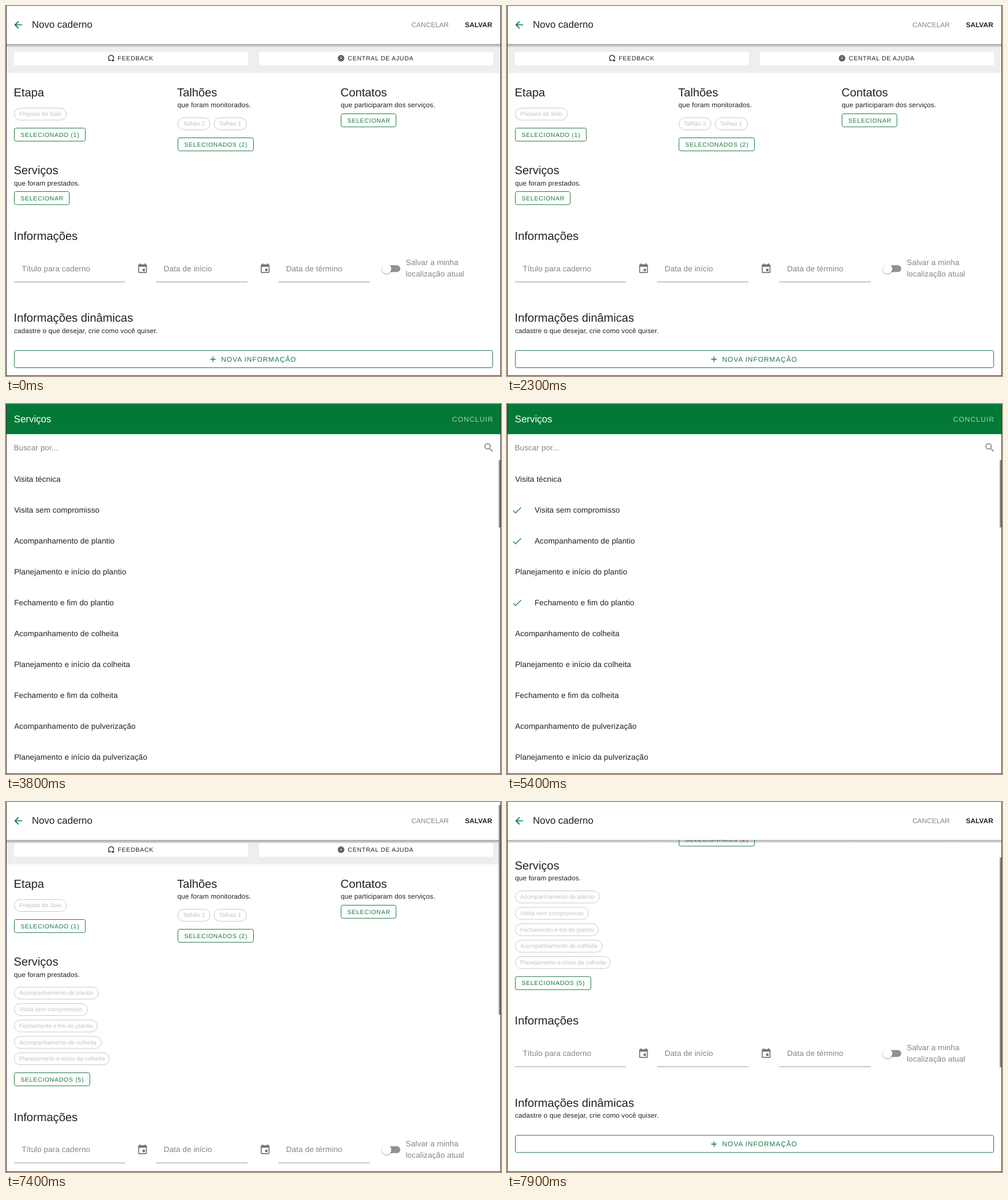
Animation of 865 by 647 pixels, one loop 8000 ms. Source, as an HTML page:

```html
<!DOCTYPE html>
<html lang="pt">
<head>
<meta charset="utf-8">
<style>
html, body { margin: 0; width: 100%; height: 100%; overflow: hidden; background: #fff; }
svg { display: block; font-family: "Liberation Sans", Arial, sans-serif; }
text { fill: #212121; white-space: pre; text-rendering: geometricPrecision; }
.head { font-size: 20.3px; }
.bar { font-size: 17px; }
.sub { font-size: 11.9px; letter-spacing: .127px; }
.item { font-size: 13.6px; letter-spacing: .1px; }
.label { font-size: 13.6px; letter-spacing: .1px; fill: #858585; }
.cap { font-size: 10.6px; letter-spacing: .7px; }
.green { fill: #1b7843; }
.chip { font-size: 10.2px; fill: #c2c2c2; }
.action { font-size: 12px; }
.wide { font-size: 12px; letter-spacing: .95px; }
.done { font-size: 12.3px; letter-spacing: 1px; fill: #a5cfb6; }
.outline { fill: #fff; stroke: #1b7843; }
.pill { fill: #fff; stroke: #c9c9c9; }
.line { fill: none; stroke: #222; stroke-width: 1.3; }
</style>
</head>
<body>
<script>
const W = 865, H = 647, LOOP = 8000;

const text = (x, y, s, cls, extra = '') => `<text x="${x}" y="${y}" class="${cls}" ${extra}>${s}</text>`;
const rect = (x, y, w, h, attrs) => `<rect x="${x}" y="${y}" width="${w}" height="${h}" ${attrs}/>`;
const icon = (x, y, d, fill) => `<path transform="translate(${x} ${y}) scale(.85)" fill="${fill}" d="${d}"/>`;
const section = (x, y, title, sub) => text(x - .5, y, title, 'head') + (sub ? text(x, y + 19.5, sub, 'sub') : '');
const button = (x, y, w, s) =>
  rect(x + .5, y + .5, w - 1, 22.8, 'rx="3" class="outline"') + text(x + 11.5, y + 15.5, s, 'cap green');
const chip = (x, y, w, s) =>
  rect(x + .5, y + .5, w - 1, 21, 'rx="10.5" class="pill"') + text(x + 9.2, y + 14.2, s, 'chip');

const BACK = 'M20 11H7.83l5.59-5.59L12 4l-8 8 8 8 1.41-1.41L7.83 13H20z';
const DATE = 'M17 12h-5v5h5zM16 1v2H8V1H6v2H5a2 2 0 0 0-2 2v14a2 2 0 0 0 2 2h14a2 2 0 0 0 2-2V5a2 2 0 0 0-2-2h-1V1zM19 19H5V8h14z';
const CHECK = 'M9 16.17 4.83 12l-1.42 1.41L9 19 21 7l-1.41-1.41z';
const SEARCH = 'M15.5 14h-.79l-.28-.27a6.5 6.5 0 1 0-.7.7l.27.28v.79l5 4.99L20.49 19zM9.5 14a4.5 4.5 0 1 1 0-9 4.5 4.5 0 0 1 0 9z';

const picked = ['Acompanhamento de plantio', 'Visita sem compromisso', 'Fechamento e fim do plantio',
  'Acompanhamento de colheita', 'Planejamento e início da colheita'];
const pillWidths = [148, 129, 146, 153, 167];

const field = (x, w, s) => text(x + 13.5, 463.5, s, 'label') + rect(x, 482, w, 1, 'fill="#959595"');

const toolbar = rect(0, 67, W, 50, 'fill="#eee"') +
  rect(14, 80, 408.5, 23.7, 'rx="2" fill="#fff"') + rect(442.5, 80, 408.5, 23.7, 'rx="2" fill="#fff"') +
  '<path class="line" d="M184 95.2h-4.6l1-1.6a4.4 4.4 0 1 1 7.4-1.4M186.9 92.8v4.4M184.7 95h4.4"/>' +
  text(195.2, 95.2, 'FEEDBACK', 'cap') +
  '<g class="line"><circle cx="585.5" cy="91.3" r="4.9"/><circle cx="585.5" cy="91.3" r="2.2"/>' +
  '<path d="M584 86.5v3M587 86.5v3M584 93v3M587 93v3M580.7 89.8h3M580.7 92.8h3M587.3 89.8h3M587.3 92.8h3" stroke-width="1"/></g>' +
  text(597.3, 95.2, 'CENTRAL DE AJUDA', 'cap');

const form = `<g id="form"><g id="page">${toolbar}
  ${section(14, 157.6, 'Etapa')}${chip(14, 178, 92, 'Preparo do Solo')}${button(14, 213, 125, 'SELECIONADO (1)')}
  ${section(299.6, 157.6, 'Talhões', 'que foram monitorados.')}
  ${chip(300, 195, 57, 'Talhão 2')}${chip(363, 195, 58, 'Talhao 1')}${button(300, 230, 133, 'SELECIONADOS (2)')}
  ${section(585, 157.6, 'Contatos', 'que participaram dos serviços.')}${button(585, 188, 97, 'SELECIONAR')}
  ${section(14, 294.2, 'Serviços', 'que foram prestados.')}
  <g id="empty">${button(14, 324, 97, 'SELECIONAR')}</g>
  <g id="filled">${picked.map((s, i) => chip(14, 331.2 + i * 28.7, pillWidths[i], s)).join('')}
    ${button(14, 481, 133, 'SELECIONADOS (5)')}</g>
  <g id="rest">${section(14, 409, 'Informações')}
    ${field(14, 194, 'Título para caderno')}${field(262, 160, 'Data de início')}${field(476, 160, 'Data de término')}
    ${icon(228.4, 449.2, DATE, '#757575')}${icon(442.6, 449.2, DATE, '#757575')}
    ${rect(660, 453.3, 29, 12, 'rx="6" fill="#929292"')}
    <circle cx="665" cy="459.6" r="8.5" fill="#fff" style="filter:drop-shadow(0 1.2px 1.2px #0006)"/>
    ${text(698.5, 453.4, 'Salvar a minha', 'label')}${text(698.5, 473.4, 'localização atual', 'label')}
    ${section(14, 552.2, 'Informações dinâmicas', 'cadastre o que desejar, crie como você quiser.')}
    ${rect(14.5, 602.5, 836, 30, 'rx="3" class="outline"')}
    <path d="M357 617.8h9.4M361.7 613.1v9.4" stroke="#1b7843" stroke-width="1.4"/>
    ${text(376, 622, 'NOVA INFORMAÇÃO', 'wide green')}</g></g>
  ${rect(0, 0, W, 66.6, 'fill="#fff"')}${rect(0, 66.6, W, 6, 'fill="url(#shade)"')}
  ${icon(11.1, 22.8, BACK, '#0a7a38')}${text(45.2, 38.3, 'Novo caderno', 'bar')}
  ${text(708.4, 37.3, 'CANCELAR', 'action', 'style="fill:#858585"')}
  ${text(802, 37.3, 'SALVAR', 'action', 'font-weight="bold"')}
  <rect id="thumb" x="861" width="3" rx="1" fill="#8d8d8d"/></g>`;

const services = [['Visita técnica'], ['Visita sem compromisso', 4800], ['Acompanhamento de plantio', 4500],
  ['Planejamento e início do plantio'], ['Fechamento e fim do plantio', 5300], ['Acompanhamento de colheita', 5600],
  ['Planejamento e início da colheita', 6000], ['Fechamento e fim da colheita'],
  ['Acompanhamento de pulverização'], ['Planejamento e início da pulverização']];

const list = `<g id="list">${rect(0, 0, W, H, 'fill="#fff"')}${rect(0, 0, W, 52.7, 'fill="#047836"')}
  ${text(13.8, 31.5, 'Serviços', 'bar', 'style="fill:#fff"')}${text(779.6, 30.5, 'CONCLUIR', 'done')}
  ${text(13.4, 81, 'Buscar por...', 'label')}${icon(833.5, 66, SEARCH, '#858585')}
  ${services.map(([s], i) => `<g class="row" transform="translate(0 ${i * 54})">
    ${icon(7.3, 121.6, CHECK, '#469a5c')}${text(14.2, 136, s, 'item')}</g>`).join('')}
  ${rect(861, 98, 3, 118, 'rx="1" fill="#8d8d8d"')}</g>`;

document.body.innerHTML = `<svg width="${W}" height="${H}" viewBox="0 0 ${W} ${H}">
  <linearGradient id="shade" x2="0" y2="1"><stop stop-color="#000" stop-opacity=".36"/>
    <stop offset=".4" stop-color="#000" stop-opacity=".2"/><stop offset="1" stop-opacity="0"/></linearGradient>
  ${form}${list}<path d="M.5 0V646.5H864.5V0" fill="none" stroke="#333"/></svg>`;

const $ = id => document.getElementById(id);
const show = (el, on) => el.style.display = on ? '' : 'none';
const rows = [...document.querySelectorAll('.row')];

// Scroll offsets advance in 100 ms steps.
const scrolls = [[3000, 1], [3100, 2], [3200, 3.4], [7400, 8], [7500, 31], [7600, 67.4], [7700, 112], [7800, 150], [7900, 176.2]];

function draw(t) {
  const inList = t >= 700 && t < 2200 || t >= 3800 && t < 6700;
  const filled = t >= 6700;
  const scroll = scrolls.reduce((y, [at, to]) => t >= at ? to : y, 0);

  show($('list'), inList);
  show($('form'), !inList);
  show($('empty'), !filled);
  show($('filled'), filled);
  $('page').setAttribute('transform', `translate(0 ${-scroll})`);
  $('rest').setAttribute('transform', `translate(0 ${filled ? 156.6 : 0})`);

  const fade = t < 3000 ? 0 : t < 3400 ? 1 : t < 3600 ? 1 - (Math.floor(t / 100) - 33) / 3 : t < 7400 ? 0 : 1;
  $('thumb').setAttribute('opacity', fade);
  $('thumb').setAttribute('y', 1 + Math.floor(scroll * .55));
  $('thumb').setAttribute('height', filled ? 367 : 424);

  rows.forEach((row, i) => {
    const on = t >= services[i][1];
    show(row.firstElementChild, on);
    row.lastElementChild.setAttribute('x', on ? 48.2 : 14.2);
  });
}

const start = performance.now();
function tick() {
  draw((performance.now() - start) % LOOP);
  requestAnimationFrame(tick);
}
tick();
</script>
</body>
</html>
```
